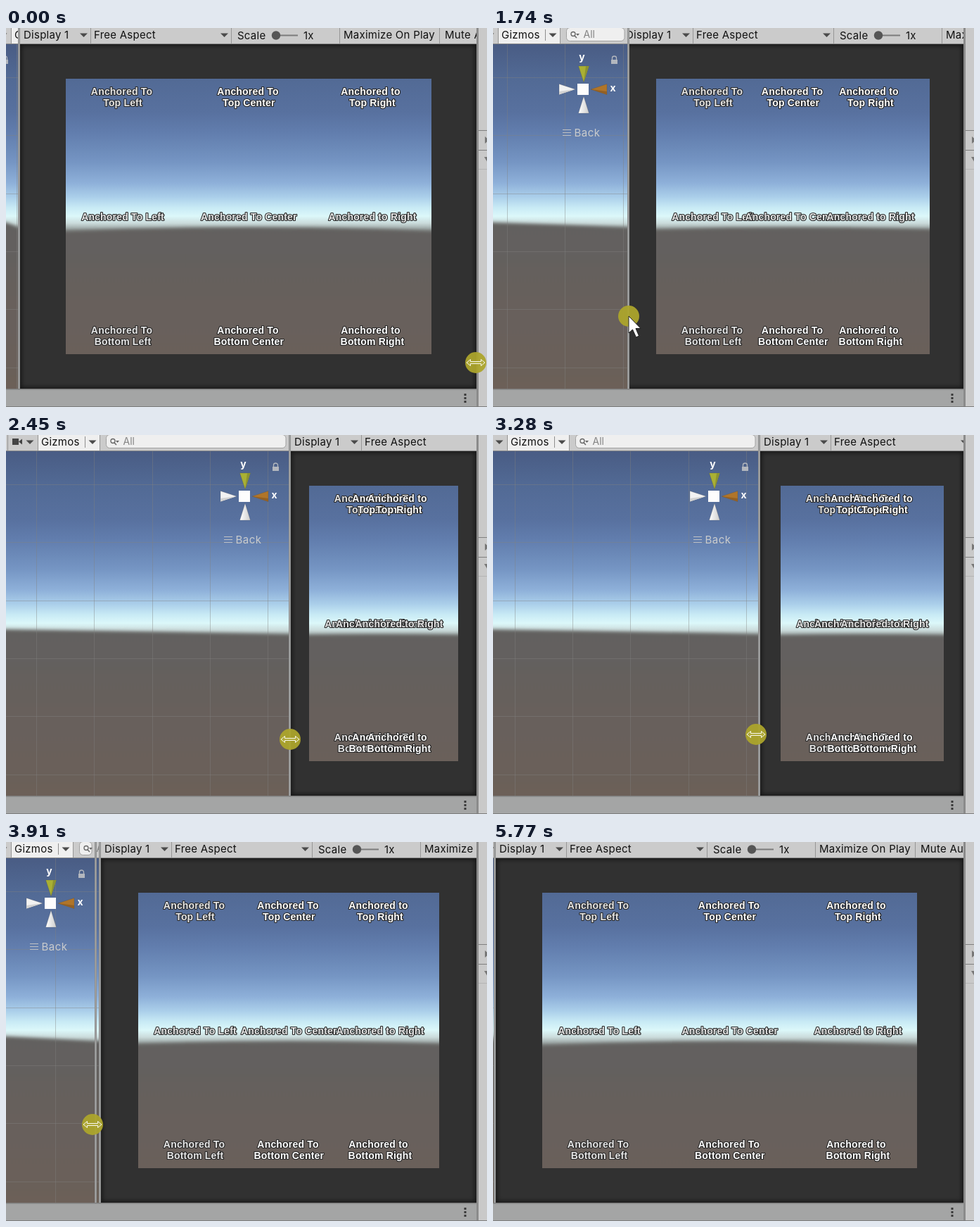
Write an HTML page that moves like this. It is 684 px wide and 538 px high and loops after 6.03 s.

```html
<!DOCTYPE html>
<html lang="en">
<head>
<meta charset="utf-8">
<title>Anchored labels in a resized view</title>
<style>
  html, body { margin: 0; width: 100%; height: 100%; overflow: hidden; background: #c8c8c8; }
  #stage { display: block; width: 684px; height: 538px; }
  text { white-space: pre; }
  .ui { font: 15px Inter, "Open Sans", sans-serif; letter-spacing: .25px; fill: #111; }
  .soft { font: 14px Inter, sans-serif; fill: #858585; }
  .back { font: 15px Inter, sans-serif; letter-spacing: .5px; fill: #c9cbcd; }
  .axis { font: bold 14px Inter, sans-serif; fill: #fff; text-anchor: middle; }
  .label { font: bold 14px "Liberation Sans", Arial, sans-serif; letter-spacing: .18px;
           text-anchor: middle; fill: #fff; stroke: #262626; stroke-width: 2.2px;
           stroke-linejoin: round; paint-order: stroke; }
  .dim { fill: #e6e6e6; }
</style>
</head>
<body>
<svg id="stage" viewBox="0 0 684 538">
  <defs>
    <linearGradient id="sky" gradientUnits="userSpaceOnUse" x1="0" y1="23" x2="0" y2="288">
      <stop offset="0" stop-color="#495c84"/>
      <stop offset=".185" stop-color="#526a95"/>
      <stop offset=".366" stop-color="#58719f"/>
      <stop offset=".479" stop-color="#627eae"/>
      <stop offset=".63" stop-color="#7595c3"/>
      <stop offset=".743" stop-color="#8eb0d9"/>
      <stop offset=".819" stop-color="#abcfea"/>
      <stop offset=".875" stop-color="#c8eaf5"/>
      <stop offset=".921" stop-color="#dcf8fa"/>
      <stop offset=".958" stop-color="#cbdcdc"/>
      <stop offset="1" stop-color="#8f9795"/>
    </linearGradient>
    <linearGradient id="ground" gradientUnits="userSpaceOnUse" x1="0" y1="278" x2="0" y2="512">
      <stop offset="0" stop-color="#62615f"/>
      <stop offset=".4" stop-color="#66605c"/>
      <stop offset="1" stop-color="#6c6059"/>
    </linearGradient>
    <linearGradient id="cone" x1="0" x2="1">
      <stop offset="0" stop-color="#fff"/>
      <stop offset="1" stop-color="#cdcdcd"/>
    </linearGradient>
    <filter id="haze"><feGaussianBlur stdDeviation="2.6"/></filter>
    <filter id="shade"><feGaussianBlur stdDeviation="3"/></filter>
  </defs>
  <g id="view"></g>
  <g id="frame"></g>
  <g id="pointer"></g>
</svg>
<script>
const LOOP = 6030, STEP = 70, RIGHT = 669, BOTTOM = 512;
const byId = id => document.getElementById(id);

// time, splitter x, pointer x, pointer y
const KEYS = [
  [0, 17, 668, 475], [630, 17, 57, 388], [980, 17, 19, 404], [1120, 17, 19, 404],
  [1790, 192.5, 195, 409], [2380, 402, 404, 432], [2450, 402, 404, 432],
  [2730, 424, 426, 434], [3150, 377, 374, 427], [3280, 377, 374, 425],
  [3910, 126, 123, 401], [4480, 17, 16, 392], [4830, 17, 16, 392],
  [5250, 1, 1, 390], [5530, 1, 1, 390], [5740, 1, -40, 400]
];

function poseAt(t) {
  const next = KEYS.findIndex(k => k[0] > t);
  if (next < 0) return KEYS[KEYS.length - 1].slice(1);
  const a = KEYS[next - 1], b = KEYS[next];
  const u = (1 - Math.cos(Math.PI * (t - a[0]) / (b[0] - a[0]))) / 2;
  return [1, 2, 3].map(i => Math.round(a[i] + (b[i] - a[i]) * u));
}

const rect = (x, y, w, h, fill, more = '') =>
  `<rect x="${x}" y="${y}" width="${Math.max(0, w)}" height="${h}" fill="${fill}" ${more}/>`;
const path = (d, fill, more = '') => `<path d="${d}" fill="${fill}" ${more}/>`;
const text = (x, y, cls, s) => `<text x="${x}" y="${y}" class="${cls}">${s}</text>`;
const caret = x => path(`M${x - 5.5} 7.5h11l-5.5 5.5z`, '#4b4b4b');
const divider = x => rect(x, 0, 1, 22, '#969696');
const bar = w => rect(0, 0, w, 22, '#cbcbcb') + rect(0, 22, w, 1, '#8c8c8c');

// Sky and ground; horizon runs from y0 through control yc to y1
function landscape(w, y0, yc, y1) {
  return rect(0, 23, w, 490, 'url(#sky)') +
    path(`M-40 ${y0}H0Q${w / 2} ${yc} ${w} ${y1}H${w + 40}V560H-40Z`, 'url(#ground)', 'filter="url(#haze)"');
}

function grid(s) {
  let d = '';
  const gap = 82.3, first = (s / 2 + 6.7) % gap;
  for (let x = first; x < s; x += gap) d += `M${Math.round(x) + .5} 23V512`;
  for (let i = 0; i < 6; i++) d += `M0 ${Math.round(70 + i * gap) + .5}H${s}`;
  return path(d, 'none', 'stroke="#80807e" stroke-opacity=".42"');
}

function gizmo(s) {
  const c = s - 63;
  const edge = 'stroke="#3c3c3c" stroke-opacity=".35" stroke-width=".6"';
  return `<g transform="translate(${c} 87)">` +
    path('M-6.5 -33H8.5L1 -10Z', '#a9b034', edge) + path('M4 -33H8.5L1 -10Z', '#8c9330') +
    path('M34 -7.5V7.5L11 0Z', '#b0752a', edge) + path('M34 3V7.5L11 0Z', '#926024') +
    path('M-34 -7.5V7.5L-11 0Z', '#f2f2f2', edge) + path('M-34 3V7.5L-11 0Z', '#d2d2d2') +
    path('M-6.5 34H8.5L1 10Z', 'url(#cone)', edge) +
    rect(-8, -8, 16, 16, '#fdfdfd') +
    text(-1.5, -41, 'axis', 'y') + text(42.5, 3, 'axis', 'x') + '</g>' +
    rect(s - 23, 45, 9, 6, '#b3b7be') +
    path(`M${s - 21.5} 45v-2.5a3 2.5 0 0 1 6 0v2.5`, 'none', 'stroke="#b3b7be" stroke-width="1.3"') +
    path(`M${s - 92} 144.5h12m-12 4h12m-12 4h12`, 'none', 'stroke="#bfc1c4" stroke-width="1.1"') +
    text(s - 75.5, 154, 'back', 'Back');
}

function sceneBar(s) {
  const g = Math.max(12, s - 352), f = g + 92.5;
  return bar(s) +
    rect(g - 41, 5, 9, 9, '#444') + path(`M${g - 32} 9.5l5 -4v8z`, '#444') +
    caret(g - 16) + divider(g - 48) +
    rect(g - 5, 0, 88, 22, '#efefef') + divider(g - 5) + divider(g + 83) +
    text(g, 15, 'ui', 'Gizmos') + rect(g + 62, 2, 1, 16, '#8e8e8e') + caret(g + 73) +
    rect(f, -.5, s - 4 - f, 19, '#efefef', 'rx="5" stroke="#a2a2a2"') +
    path(`M${g + 104} 11l3 3`, 'none', 'stroke="#666" stroke-width="1.5"') +
    `<circle cx="${g + 102}" cy="8.5" r="3" fill="none" stroke="#666" stroke-width="1.3"/>` +
    path(`M${g + 106} 8h5l-2.5 3z`, '#666') +
    text(g + 116.5, 14, 'soft', 'All');
}

function scene(s) {
  return `<svg width="${s}" height="${BOTTOM}">` +
    landscape(s, 276, 279, 283) + grid(s) + gizmo(s) + sceneBar(s) + '</svg>' +
    rect(s, 0, 3, BOTTOM, '#8f9090') + rect(s + 1, 0, 1, BOTTOM, '#a3a4a4');
}

function labels(w) {
  const columns = [
    [79.5, 81, 'To', 'Left', 'label dim'],
    [w / 2 - 1, w / 2 + .3, 'To', 'Center', 'label'],
    [w - 86.5, w - 84, 'to', 'Right', 'label']
  ];
  return columns.map(([x1, x2, to, side, cls]) =>
    text(x1, 95, cls, `Anchored ${to}`) + text(x2, 111, cls, `Top ${side}`) +
    text(x2, 273, cls + ' dim', `Anchored ${to} ${side}`) +
    text(x1, 434, cls, `Anchored ${to}`) + text(x2, 450, cls, `Bottom ${side}`)).join('');
}

function gameBar(w) {
  return bar(w) +
    text(5, 15, 'ui', 'Display 1') + caret(90.5) + divider(100) +
    text(105, 15, 'ui', 'Free Aspect') + caret(290.5) + divider(300) +
    text(309, 16, 'ui', 'Scale') + rect(364, 9.5, 31, 2, '#7c7c7c') +
    '<circle cx="364" cy="10.5" r="6.2" fill="#555"/>' +
    text(403, 16, 'ui', '1x') + divider(454) +
    text(460, 15, 'ui', 'Maximize On Play') + divider(596) +
    text(604, 15, 'ui', 'Mute Audio');
}

function game(left) {
  const w = RIGHT - left, pw = Math.round(w * .8012), px = Math.round((w - pw) / 2 + .3);
  const drop = 5 * (pw / 520) ** 2;
  return `<svg x="${left}" width="${w}" height="${BOTTOM}">` +
    rect(0, 23, w, 489, '#313131') +
    rect(-1, 22, w + 2, 491, 'none', 'stroke="#000" stroke-opacity=".6" stroke-width="6" filter="url(#shade)"') +
    `<svg x="${px}" y="72" width="${pw}" height="391" viewBox="0 72 ${pw} 391">` +
    landscape(pw, 283 + drop, 283 - drop, 283 + drop) + labels(pw) + '</svg>' +
    gameBar(w) + '</svg>';
}

function chrome() {
  const dots = [519, 524, 529].map(y => rect(651.5, y, 3, 3, '#3a3a3a')).join('');
  const lines = [145, 173, 200].map((y, i) => rect(672, y, 12, 1, i < 2 ? '#7f7f7f' : '#b4b4b4')).join('');
  return rect(0, 512, 670, 26, '#a4a5a5') + rect(0, 512, 670, 1.5, '#808080') +
    rect(0, 537, 684, 1, '#7d7d7d') + dots +
    rect(669, 0, 3, 537, '#8b8b8b') + rect(672, 0, 12, 537, '#c9c9c9') + lines +
    path('M681 154l6 5l-6 5z', '#777') + path('M680 183h10l-5 8z', '#777');
}

function pointer(x, y, arrow) {
  const shape = arrow
    ? path('M0 0V24L5.5 19L10.5 30L14.5 28L10 17.5H17Z', '#fff', 'stroke="#222" stroke-width="1"')
    : path('M-13 0L-7.5 -4.5V-1.5H7.5V-4.5L13 0L7.5 4.5V1.5H-7.5V4.5Z', '#b0aa3c', 'stroke="#fff" stroke-width=".9"');
  return `<g transform="translate(${x} ${y})"><circle r="15" fill="#aca52c" fill-opacity=".94"/>${shape}</g>`;
}

let shown = -1;
function draw(t) {
  const now = Math.floor((t + 20) / STEP) * STEP;
  if (now === shown) return;
  shown = now;
  const [split, x, y] = poseAt(now);
  const late = poseAt(Math.max(0, now - STEP))[0];
  // The right-hand view repaints one step after the splitter
  byId('view').innerHTML = scene(late) + game(late + 3) + (late === split ? '' : scene(split));
  const arrow = (now > 0 && now < 980) || (now > 1680 && now < 1820);
  byId('pointer').innerHTML = pointer(x, y, arrow);
}

byId('frame').innerHTML = chrome();
const start = performance.now();
function tick() {
  draw((performance.now() - start) % LOOP);
  requestAnimationFrame(tick);
}
tick();
</script>
</body>
</html>
```
